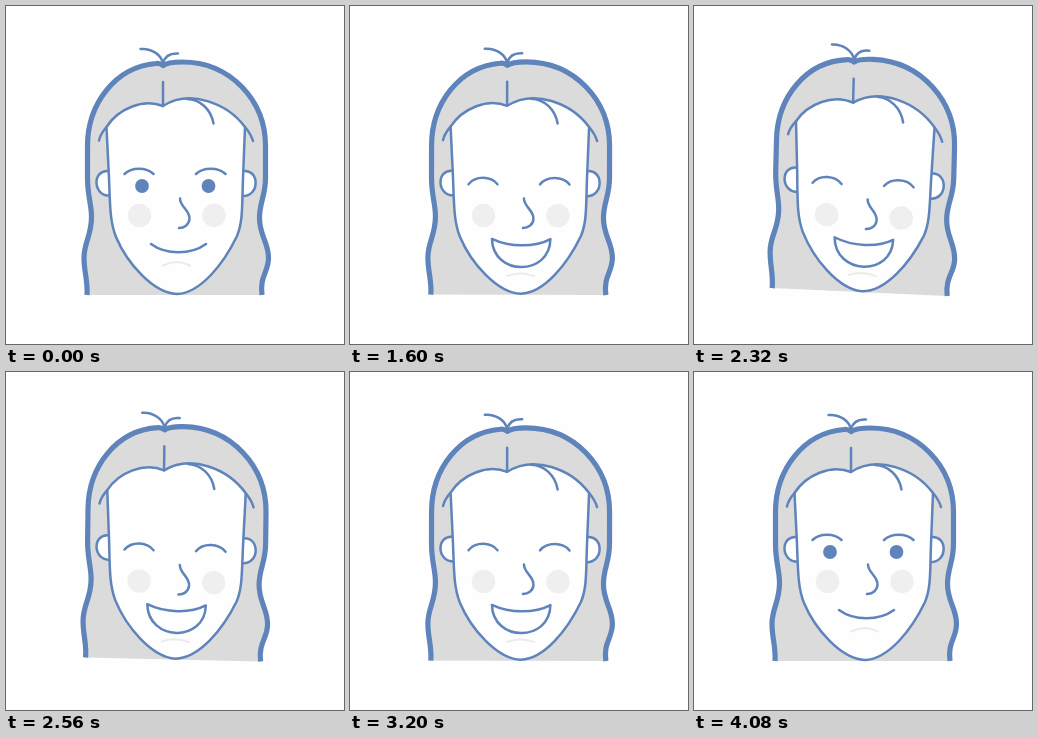
An HTML page for the animation above (5320 ms loop, 338x338 px).

```html
<!DOCTYPE html>
<html lang="en">
<head>
<meta charset="utf-8">
<title>Laughing face</title>
<style>
html, body { margin: 0; width: 100%; height: 100%; overflow: hidden; background: #fefefe; }
svg { display: block; width: 100%; height: 100%; }
.line { fill: none; stroke: #5f84bb; stroke-width: 2.5; stroke-linecap: round; stroke-linejoin: round; }
.white { fill: #fefefe; }
.hair { fill: #dbdbdc; }
.thick { stroke-width: 5.2; stroke-linecap: butt; }
.cheek { fill: #efefef; }
.eye { fill: #5f84bb; }
.chin { fill: none; stroke: #ebebeb; stroke-width: 2; stroke-linecap: round; }
</style>
</head>
<body>
<svg viewBox="0 0 338 338">
  <g id="back">
    <path class="hair line thick" d="M81 289C82 275 78 266 78 252C78 236 85.500 230 85.500 211C85.500 198 81.500 190 81.500 172V140C81.500 98 109 61 150 57.500Q154 57 157 59.500Q162 56 176 56C224 56 259.500 94 259.500 140V172C259.500 190 253.500 196 253.500 212C253.500 230 262.500 236 262.500 252C262.500 266 253.500 270 256 289"/>
    <path class="line" d="M134.500 43C146 42 155 49 157 57C159 50 165 47 172 47.500"/>
  </g>
  <g id="ears">
    <path class="line white" d="M103 165C86 163 86 191 105 189.500M237 165C254 163 254 191 236 190"/>
  </g>
  <g id="face">
    <path class="line white" d="M100.500 121L103 172C104 200 104 216 110 231C121 257 147 287 171 288C195 287 218 257 231 230C237 216 236 200 237 172L239 121C221 97 184 83 157 100C137 92 112 103 100.500 121Z"/>
    <path class="line" d="M93 134.500C94 129 97 125 100.500 121M239 121Q245 128 247 135M157 76V100M181 93C194 93.500 205 103 207.500 117.500"/>
  </g>
  <g id="features">
    <circle class="cheek" cx="133.500" cy="209.500" r="11.700"/>
    <circle class="cheek" cx="208" cy="209.500" r="11.700"/>
    <path class="line" d="M174 192.500C174 201 184 204 183.500 213C183 219 178 222 173 222"/>
    <circle class="eye" cx="136" cy="180" r="6.900"/>
    <circle class="eye" cx="202.500" cy="180" r="6.900"/>
    <path class="line" id="brows"/>
  </g>
  <g id="jaw">
    <path class="chin" id="chin"/>
    <path class="line white" id="mouth"/>
  </g>
</svg>
<script>
const LOOP = 5320;
const TILT = [[1200, 0], [1400, 1], [1600, 0.06], [1940, -1], [2320, 1],
              [2800, 0], [3000, 1], [3200, 0.06], [3680, 1], [4080, 0]];
const LAUGH = [[1200, 0], [1440, 1], [3840, 1], [4080, 0]];

const $ = id => document.getElementById(id);
const eyes = document.querySelectorAll('.eye');
const mix = (a, b, k) => a + (b - a) * k;
const ease = k => k * k * (3 - 2 * k);

function track(keys, t) {
  if (t <= keys[0][0]) return keys[0][1];
  for (let i = 1; i < keys.length; i++) {
    const [t0, a] = keys[i - 1], [t1, b] = keys[i];
    if (t < t1) return mix(a, b, ease((t - t0) / (t1 - t0)));
  }
  return keys[keys.length - 1][1];
}

// Slight shear around the head's middle, with a lift per layer.
function lean(id, k, lift) {
  const v = 0.045 * k, h = -0.026 * k;
  $(id).setAttribute('transform', `matrix(1 ${v} ${h} 1 ${-180 * h} ${-170 * v + lift * k})`);
}

const arc = (x0, x1, y, rise) =>
  `M${x0} ${y}C${x0 + 7} ${y - rise} ${x1 - 7} ${y - rise} ${x1} ${y}`;

function draw(t) {
  const k = track(TILT, t), s = track(LAUGH, t);
  lean('back', k, -2.9);
  lean('face', k, -2.7);
  lean('ears', k, -0.4);
  lean('features', k, 0.8);
  lean('jaw', k, -0.5);

  const browY = mix(168, 178.3, s), rise = mix(7, 8.5, s);
  $('brows').setAttribute('d', arc(118.5, 147.5, browY, rise) + arc(190, 219.5, browY, rise));
  const r = 6.9 * Math.max(0, 1 - s * 1.4);
  eyes.forEach(e => e.setAttribute('r', r));

  const l = mix(145, 142, s), rt = mix(200, 200.5, s), y = mix(238, 233, s);
  const top = mix(249, 241.5, s), low = mix(249, 270.5, s);
  const l2 = mix(160, 143, s), r2 = mix(185, 200, s);
  $('mouth').setAttribute('d',
    `M${l} ${y}C160 ${top} 185 ${top} ${rt} ${y}C${r2} ${low} ${l2} ${low} ${l} ${y}Z`);
  const c = mix(259.5, 270, s);
  $('chin').setAttribute('d', `M157 ${c}Q170.500 ${c - mix(7, 5, s)} 184 ${c}`);
}

const start = performance.now();
function tick() {
  draw((performance.now() - start) % LOOP);
  requestAnimationFrame(tick);
}
tick();
</script>
</body>
</html>
```
